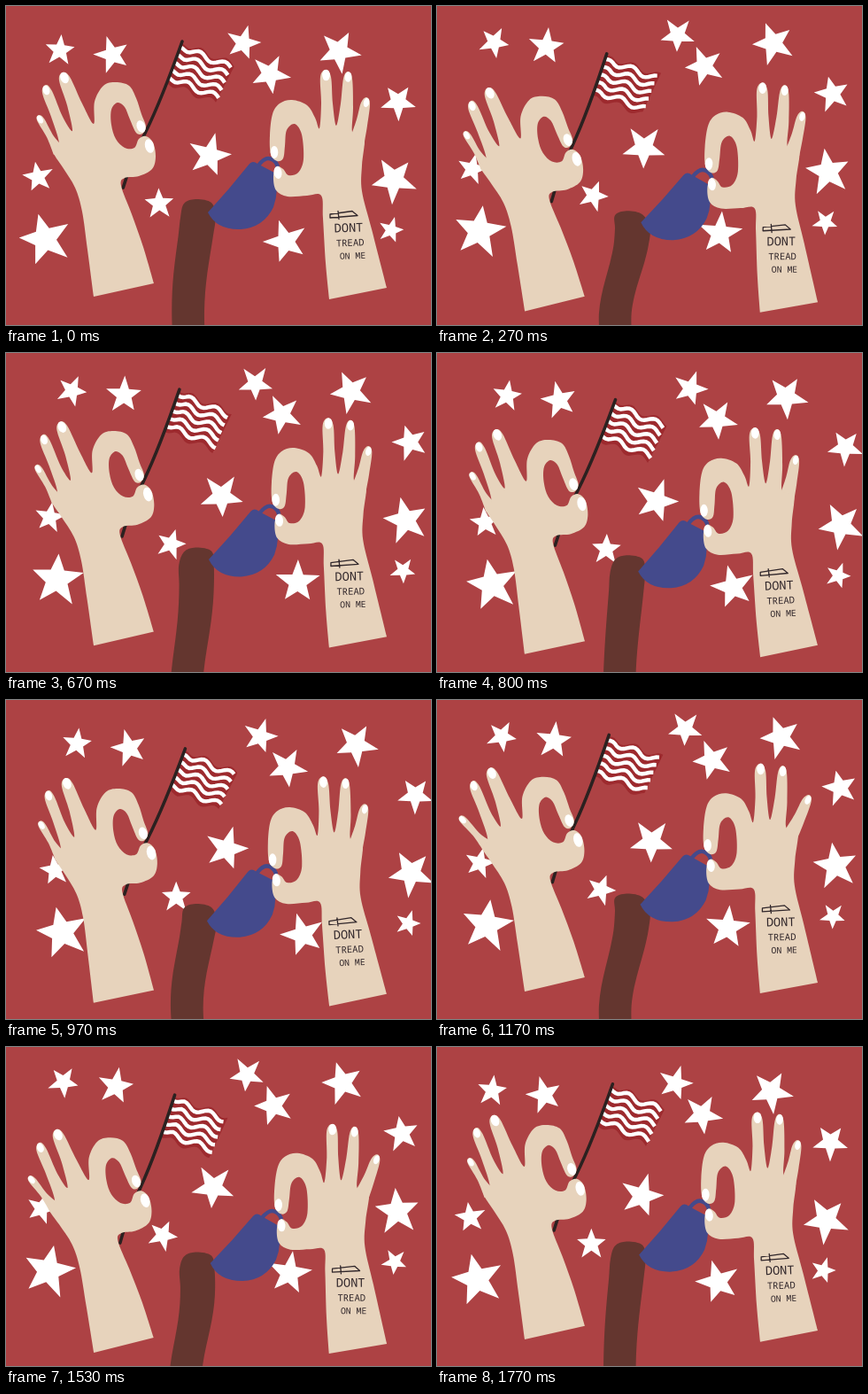
Recreate the animation shown at these times as an HTML page. Size 480 px wide and 360 px high, loop 1.81 s.

```html
<!DOCTYPE html>
<html lang="en">
<head>
<meta charset="utf-8">
<title>Hands, flag and cup</title>
<style>
  html, body { margin: 0; width: 100%; height: 100%; overflow: hidden; background: #ad4244; }
  svg { display: block; width: 100vw; height: 100vh; }
  .skin { fill: #e7d3bc; }
  .nail, .star { fill: #fff; }
  .ink { fill: none; stroke: #30262a; stroke-width: 1.3; stroke-linejoin: round; stroke-linecap: round; }
  .stripe { fill: none; stroke: #fff; stroke-width: 4.4; }
  text { font-family: "Noto Sans Mono", "Liberation Mono", monospace; fill: #30262a; }
</style>
</head>
<body>
<svg viewBox="0 0 480 360">
  <rect width="480" height="360" fill="#ad4244"/>
  <g id="stars"></g>
  <path id="stream" fill="#64362f"/>
  <g id="leftArm">
    <g transform="translate(199 40) rotate(22)">
      <path id="cloth" fill="#9d2a2e"/>
      <g id="stripes"></g>
      <path d="M0 0Q3 70 0 110T0 178" fill="none" stroke="#2b2120" stroke-width="3.6" stroke-linecap="round"/>
    </g>
    <g id="leftPinky"></g>
    <g id="leftHand"></g>
  </g>
  <g id="rightArm">
    <path d="M285 180Q294 168 302 174Q308 178 307 188" fill="none" stroke="#444a8c" stroke-width="4.5"/>
    <path d="M228 233Q252 207 275 178Q279 174 284 178L303 188Q309 208 302 227Q291 250 265 252Q238 253 228 233Z" fill="#444a8c"/>
    <g id="rightPinky"></g>
    <g id="rightHand"></g>
    <path class="ink" d="M366 235L391 231.5L397 236.5L366 239ZM375 231.5L376 240.5"/>
    <g transform="rotate(-2 387 260)">
      <text x="371" y="255" font-size="13.6">DONT</text>
      <text x="372.5" y="271" font-size="10.6">TREAD</text>
      <text x="376" y="285.5" font-size="9.8">ON ME</text>
    </g>
  </g>
</svg>
<script>
const LOOP = 1810, STEP = LOOP / 54, TAU = Math.PI * 2;
const $ = id => document.getElementById(id);

function add(parent, tag, attrs) {
  const el = document.createElementNS("http://www.w3.org/2000/svg", tag);
  for (const key in attrs) el.setAttribute(key, attrs[key]);
  return parent.appendChild(el);
}

const parse = text => text.split(" ").map(pair => pair.split(",").map(Number));
const fix = n => n.toFixed(2);

// Smooth curve through the points, closed by a straight edge.
function curve(pts) {
  let d = "M" + pts[0];
  for (let i = 0; i < pts.length - 1; i++) {
    const a = pts[Math.max(i - 1, 0)], b = pts[i], c = pts[i + 1];
    const e = pts[Math.min(i + 2, pts.length - 1)];
    const k = [0, 1].map(j => [b[j] + (c[j] - a[j]) / 6, c[j] - (e[j] - b[j]) / 6, c[j]]);
    d += "C" + [0, 1, 2].map(n => fix(k[0][n]) + " " + fix(k[1][n])).join(" ");
  }
  return d + "Z";
}

const skin = (id, text) => add($(id), "path", { class: "skin", d: curve(parse(text)) });
const nail = (id, x, y, rx, ry, turn) =>
  add($(id), "ellipse", { class: "nail", cx: x, cy: y, rx, ry, transform: `rotate(${turn} ${x} ${y})` });

skin("leftHand", "99,328 92,275 86,232 78,205 64,182 53,164 60,155 51,125 41,98 45,89 52,96 64,125 75,141 " +
  "69,112 60,84 64,75 72,80 86,110 99,133 100,108 110,90 124,86 139,90 147,104 153,122 158,136 154,144 147,143 " +
  "140,128 134,114 126,109 119,117 119,134 124,150 134,160 145,160 150,150 158,147 166,154 169,170 165,184 " +
  "150,192 134,194 130,203 142,235 155,272 167,313");
skin("leftPinky", "54,168 46,148 35,129 37,123 43,127 54,147 66,160");
nail("leftHand", 66, 81, 4.6, 6.5, -22);
nail("leftHand", 45.5, 95, 3.8, 5.5, -18);
nail("leftPinky", 38.5, 128, 3, 4.8, -30);
nail("leftHand", 152.5, 136, 4.8, 7, -18);
nail("leftHand", 162, 158, 5, 8, -14);

skin("rightHand", "365,331 361,290 358,240 356,214 340,214 318,215 305,208 302,192 306,181 313,184 319,191 " +
  "330,188 336,173 334,145 326,133 317,140 315,158 313,172 306,175 299,167 298,146 301,122 309,110 323,106 " +
  "340,112 349,126 354,138 356,110 355,80 361,72 367,80 369,110 373,135 378,110 381,82 386,74 391,82 392,115 " +
  "391,142 398,146 405,150 402,180 402,209 413,252 430,318");
skin("rightPinky", "389,148 396,128 401,109 407,103 411,110 408,135 403,164");
nail("rightHand", 361.5, 78, 4.4, 6.3, 0);
nail("rightHand", 386.5, 80, 3.9, 5.8, 4);
nail("rightPinky", 407, 109, 3.2, 5.2, 12);
nail("rightHand", 303, 165, 4.3, 7, 0);
nail("rightHand", 307, 188, 4.5, 7, -8);

// x, y, radius, angle of one tip
const stars = [
  [61, 50, 18, -85], [120, 55, 21, -107], [268, 42, 20, -75], [298, 77, 23, -63], [376, 51, 25, -62],
  [443, 108, 21, -55], [438, 196, 27, -122], [435, 253, 15, -75], [230, 169, 25, -76], [316, 266, 25, -108],
  [36, 193, 18, -100], [44, 263, 31, -105], [173, 223, 18, -92]
].map(([x, y, r, tip], n) => {
  const pts = Array.from({ length: 10 }, (_, i) => {
    const a = (tip + i * 36) * TAU / 360;
    const q = r * (i % 2 ? 0.42 : 1 + 0.06 * Math.sin(i * 2.3 + n));
    return fix(q * Math.cos(a)) + "," + fix(q * Math.sin(a));
  });
  return { x, y, el: add($("stars"), "polygon", { class: "star", points: pts.join(" ") }) };
});

const stripes = Array.from({ length: 5 }, () => add($("stripes"), "path", { class: "stripe" }));

function ripple(y, length, phase) {
  return Array.from({ length: 22 }, (_, i) => {
    const x = 1 + length * i / 21;
    return fix(x) + " " + fix(y + 3.4 * Math.sin(x / 4.9 - phase) * Math.min(1, x / 12));
  });
}

function drawFlag(phase) {
  const edge = [...ripple(2, 64, phase), ...ripple(50, 60, phase).reverse()];
  $("cloth").setAttribute("d", "M" + edge.join("L") + "Z");
  stripes.forEach((el, i) => el.setAttribute("d", "M" + ripple(6.5 + i * 9.2, 61, phase).join("L")));
}

function drawStream(drop, phase) {
  const top = 218 + drop;
  const side = (mid, swing) => Array.from({ length: 7 }, (_, i) => {
    const u = i / 6;
    const sway = 3 * Math.sin(phase - 0.3 - 4 * u);
    return [mid + swing * Math.cos(Math.PI * u) + sway, top + 20 + u * (346 - top)];
  });
  const pts = [...side(229.5, 8).reverse(), [232, top + 4], [214, top], [201, top + 5], ...side(191.5, 6.5)];
  $("stream").setAttribute("d", curve(pts));
}

function draw(t) {
  const a = TAU * t / LOOP;
  const lift = 1 - Math.cos(2 * a);
  const ramp = 1 - Math.abs(1 - 2 * t / LOOP);

  const dx = 21 * ramp - 2 * lift, dy = -7 * lift, spin = 18 * lift;
  for (const s of stars)
    s.el.setAttribute("transform", `translate(${fix(s.x + dx)} ${fix(s.y + dy)}) rotate(${fix(spin)})`);

  const bob = 8 * (1 - Math.cos(3 * a));
  const lean = 0.212 * (2 * (1 - Math.cos(a)) - 6 * lift);
  const arm = (id, turn, x) =>
    $(id).setAttribute("transform", `translate(0 ${fix(bob)}) rotate(${fix(turn)} ${x} 322)`);
  arm("leftArm", lean, 133);
  arm("rightArm", -lean, 398);

  const spread = t > 900 && t < 1700 ? 15 * Math.sin(Math.PI * (t - 900) / 800) ** 2 : 0;
  $("leftPinky").setAttribute("transform", `rotate(${fix(-spread)} 60 162)`);
  $("rightPinky").setAttribute("transform", `rotate(${fix(spread)} 396 152)`);

  drawFlag(2 * a);
  drawStream(0.85 * bob, 2 * a);
}

const start = performance.now();
function tick() {
  const t = (performance.now() - start) % LOOP;
  draw(Math.floor(t / STEP + 0.15) * STEP % LOOP);
  requestAnimationFrame(tick);
}
tick();
</script>
</body>
</html>
```
